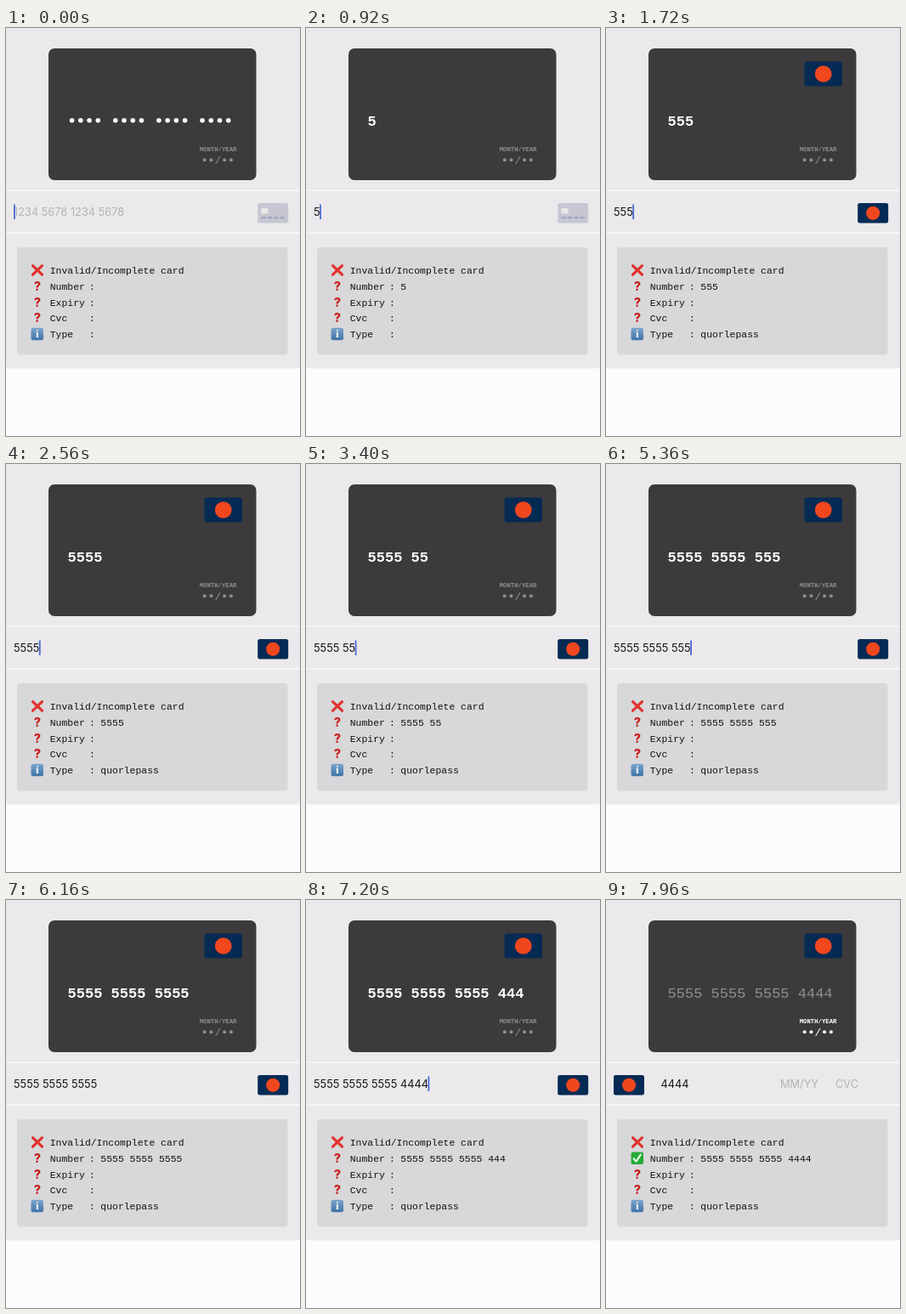
Animation, 346 px wide and 480 px high, one loop 8 s. Source, as an HTML page with a canvas:

```html
<!DOCTYPE html>
<html lang="en">
<head>
<meta charset="utf-8">
<title>Card form</title>
<style>
  html, body { margin: 0; width: 100%; height: 100%; overflow: hidden; background: #fdfbfd; }
  canvas { display: block; width: 346px; height: 480px; }
</style>
</head>
<body>
<canvas></canvas>
<script>
const W = 346, H = 480, LOOP = 8000;
const canvas = document.querySelector('canvas');
const ctx = canvas.getContext('2d');
const scale = window.devicePixelRatio || 1;
canvas.width = W * scale;
canvas.height = H * scale;

const SANS = 'Inter, sans-serif';
const MONO = '"Liberation Mono", monospace';
const FIELD_FONT = `12.8px ${SANS}`;
const PANEL_FONT = `11.45px ${MONO}`;
const CARD_NUMBER = '5555555555554444';
const PLACEHOLDER = '1234 5678 1234 5678';
const CARD_TYPE = 'quorlepass';

// Moment of each keystroke, and how far the card preview trails behind the field.
const KEYS = [560, 960, 1480, 2120, 2640, 3140, 3660, 4060, 4460,
              4840, 5200, 5560, 6400, 6660, 6920, 7180];
const PREVIEW_LAG = 50;
const COLLAPSE_START = 7230, COLLAPSE_TIME = 300;

const typedAt = t => KEYS.filter(k => k <= t).length;
const grouped = n => CARD_NUMBER.slice(0, n).replace(/(.{4})(?=.)/g, '$1 ');
const clamp = v => Math.max(0, Math.min(1, v));
const smooth = v => v * v * (3 - 2 * v);
const mix = (a, b, p) => a + (b - a) * p;

function rect(x, y, w, h, color, radius = 0) {
  ctx.fillStyle = color;
  ctx.beginPath();
  ctx.roundRect(x, y, w, h, radius);
  ctx.fill();
}

function dot(x, y, r, color) {
  ctx.fillStyle = color;
  ctx.beginPath();
  ctx.arc(x, y, r, 0, Math.PI * 2);
  ctx.fill();
}

function text(str, x, y, font, color, align = 'left') {
  ctx.font = font;
  ctx.fillStyle = color;
  ctx.textAlign = align;
  ctx.fillText(str, x, y);
}

function line(points, color, width) {
  ctx.strokeStyle = color;
  ctx.lineWidth = width;
  ctx.lineCap = ctx.lineJoin = 'round';
  ctx.beginPath();
  points.forEach(([x, y]) => ctx.lineTo(x, y));
  ctx.stroke();
}

function brandBadge(x, y, w, h) {
  rect(x, y, w, h, '#052a54', w * 0.07);
  dot(x + w / 2, y + h / 2, h * 0.34, '#f0471e');
}

function blankBadge(x, y) {
  rect(x, y, 36, 23.5, '#c6c7d2', 2.5);
  rect(x + 4, y + 6, 8.5, 6.5, '#e9e8e8', 1.5);
  for (let i = 0; i < 4; i++) rect(x + 4 + i * 7.4, y + 16, 5.8, 2.2, '#a2a6bd', 1);
}

function drawCard(count, done) {
  rect(50, 24, 244.5, 155, '#3c3a3c', 7);
  if (count >= 2) brandBadge(233.5, 39.5, 44.5, 29);

  if (count) {
    const font = `${done ? '' : 'bold '}17.05px ${MONO}`;
    text(grouped(count), 72.5, 115, font, done ? '#8f8e90' : '#fff');
  } else {
    for (let i = 0; i < 19; i++) {
      if (i % 5 < 4) dot(72.5 + (i + 0.5) * 10.23, 108.7, 2.8, '#fff');
    }
  }

  const tint = done ? '#fff' : '#8f8e90';
  text('MONTH/YEAR', 249.6, 145, `bold 7.3px ${MONO}`, tint, 'center');
  for (const i of [-2, -1, 1, 2]) dot(249.3 + i * 7.8, 155.2, 2, tint);
  text('/', 249.3, 159.5, `12.9px ${MONO}`, tint, 'center');
}

function drawCaret(x, since) {
  const phase = since % 1000;
  ctx.globalAlpha = phase < 500 ? clamp((540 - phase) / 80) : clamp((phase - 940) / 60);
  rect(x, 207.5, 1.8, 17.5, '#4a68d4');
  ctx.globalAlpha = 1;
}

function drawField(t, count) {
  rect(0, 190.5, W, 1.3, '#fbfafb');
  rect(0, 240.5, W, 1.3, '#fbfafb');
  const p = smooth(clamp((t - COLLAPSE_START) / COLLAPSE_TIME));
  const iconX = mix(296.2, 9, p);

  if (p < 1) {
    ctx.save();
    ctx.beginPath();
    ctx.rect(0, 192, iconX - 4, 48);
    ctx.clip();
    const value = grouped(count);
    text(value || PLACEHOLDER, 9, 221, FIELD_FONT, value ? '#151416' : '#b4b2b6');
    if (p === 0) {
      const lastKey = count ? KEYS[count - 1] : 0;
      drawCaret(9 + (value ? ctx.measureText(value).width - 0.5 : 0), t - lastKey);
    }
    ctx.restore();
  }

  if (typedAt(t - PREVIEW_LAG) >= 2) brandBadge(iconX, 206, 36, 23.5);
  else blankBadge(iconX, 206);

  if (p > 0) {
    const shift = iconX - 9;
    text(CARD_NUMBER.slice(-4), 64.5 + shift, 221, FIELD_FONT, '#151416');
    text('MM/YY', 205 + shift, 221, FIELD_FONT, '#b4b2b6');
    text('CVC', 270 + shift, 221, FIELD_FONT, '#b4b2b6');
    drawCaret(205 + shift, t - COLLAPSE_START);
  }
}

const icons = {
  cross(y) {
    line([[31.5, y - 5.5], [42.5, y + 5]], '#e0332c', 3.2);
    line([[42.5, y - 5.5], [31.5, y + 5]], '#e0332c', 3.2);
  },
  question(y) {
    text('?', 37, y + 5, `800 14.5px ${SANS}`, '#c9211e', 'center');
  },
  check(y) {
    rect(29.5, y - 7.5, 14.5, 14.5, '#25ab38', 2.5);
    line([[32.6, y + 0.2], [35.6, y + 3.6], [40.8, y - 4.3]], '#fff', 2);
  },
  info(y) {
    const shade = ctx.createLinearGradient(0, y - 7.5, 0, y + 7);
    shade.addColorStop(0, '#7ba6cd');
    shade.addColorStop(1, '#3f73a8');
    rect(29.5, y - 7.5, 14.5, 14.5, shade, 2.5);
    text('i', 36.8, y + 4.2, 'bold 13px "Liberation Serif", serif', '#fff', 'center');
  }
};

function drawPanel(count, done) {
  rect(13, 258, 318.5, 126.5, '#d8d7d9', 4);
  const rows = [
    ['cross', 'Invalid/Incomplete card'],
    [done ? 'check' : 'question', 'Number', grouped(count)],
    ['question', 'Expiry', ''],
    ['question', 'Cvc', ''],
    ['info', 'Type', count >= 2 ? CARD_TYPE : '']
  ];
  rows.forEach(([icon, label, value], i) => {
    const y = 285.2 + i * 18.75;
    icons[icon](y);
    text(label, 51.7, y + 4, PANEL_FONT, '#111');
    if (value === undefined) return;
    text(':', 101.4, y + 4, PANEL_FONT, '#111', 'center');
    text(value, 111.3, y + 4, PANEL_FONT, '#111');
  });
}

function draw(t) {
  const shown = typedAt(t - PREVIEW_LAG);
  const done = shown === CARD_NUMBER.length;
  ctx.setTransform(scale, 0, 0, scale, 0, 0);
  rect(0, 0, W, H, '#fdfbfd');
  rect(0, 0, W, 400.5, '#ebe9eb', [0, 0, 4, 4]);
  drawCard(shown, done);
  drawField(t, typedAt(t));
  drawPanel(shown, done);
}

const start = performance.now();
function tick() {
  draw((performance.now() - start) % LOOP);
  requestAnimationFrame(tick);
}
tick();
</script>
</body>
</html>
```
